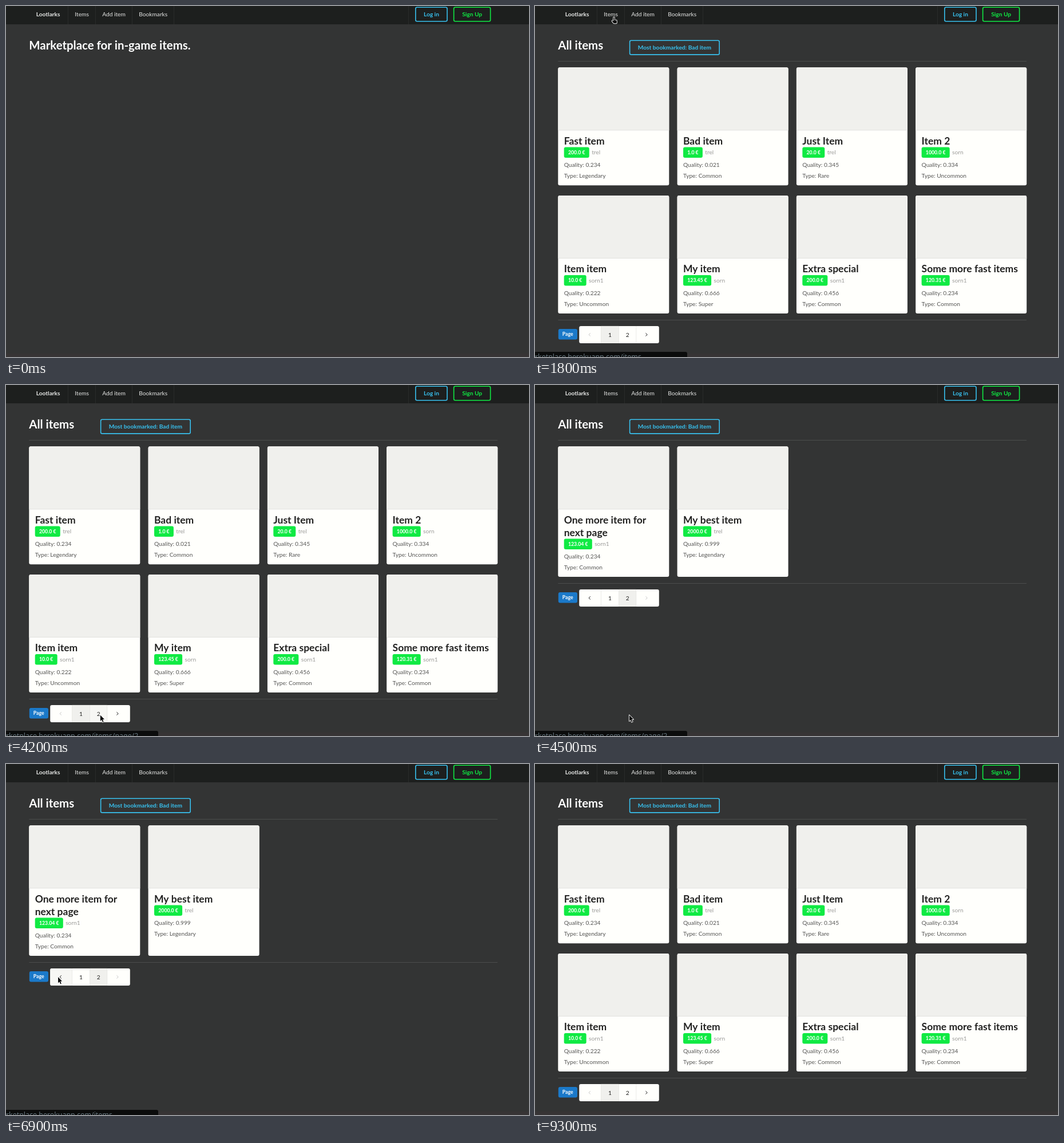
These frames come from a looping animation (914 by 613 pixels, 9600 ms). An HTML page with a canvas:

```html
<!DOCTYPE html>
<html lang="en">
<head>
<meta charset="utf-8">
<title>Item marketplace</title>
<style>
html, body { margin: 0; width: 100%; height: 100%; overflow: hidden; background: #333434; }
canvas { display: block; width: 914px; height: 613px; }
</style>
</head>
<body>
<canvas id="stage"></canvas>
<script>
const W = 914, H = 613, LOOP = 9600, STEP = 100;
const EM = 10.2, SMALL = EM * 6 / 7, H1 = EM * 2, H2 = EM * 12 / 7;
const BLUE = '#38c0ee', GREEN = '#10ea43', PAPER = '#fffffc', TINT = '#f0f0ed', INK = '#222221';
const LEFT = 40.3, WIDTH = 818.7, TOP = 107.3;
const CARD_W = 194, PITCH = 208.3, ROW = 223.6, LINE = 22;

const canvas = document.getElementById('stage');
const ctx = canvas.getContext('2d');
const dpr = window.devicePixelRatio || 1;
canvas.width = W * dpr;
canvas.height = H * dpr;

// title | price | seller | quality | type
const pages = [[
  'Fast item|200.0|trel|0.234|Legendary',
  'Bad item|1.0|trel|0.021|Common',
  'Just Item|20.0|trel|0.345|Rare',
  'Item 2|1000.0|sorn|0.334|Uncommon',
  'Item item|10.0|sorn1|0.222|Uncommon',
  'My item|123.45|sorn|0.666|Super',
  'Extra special|200.0|sorn1|0.456|Common',
  'Some more fast items|120.31|sorn1|0.234|Common'
], [
  'One more item for\nnext page|123.04|sorn1|0.234|Common',
  'My best item|2000.0|trel|0.999|Legendary'
]];

// pointer moves: start, end, then the place reached
const moves = [
  [500, 700, 135, 98], [800, 1000, 138, 19.5],
  [2000, 2300, 208, 264], [3000, 3300, 176, 472], [3400, 3600, 172, 557],
  [3700, 4200, 164.8, 576.5], [5300, 6300, 91, 372], [8700, 9100, 74, 10]
];
const statusTimes = [[1200, 1900], [3900, 4600], [6300, 7500]];

function pointerAt(t) {
  if (t < 500 || t >= 9100) return null;
  let x = 31, y = 165;
  for (const [from, to, mx, my] of moves) {
    const u = Math.min(1, Math.max(0, (t - from) / (to - from)));
    const ease = u * (2 - u);
    x += (mx - x) * ease;
    y += (my - y) * ease;
  }
  return { x, y };
}

function inside(p, x, y, w, h) {
  return p && p.x >= x && p.x < x + w && p.y >= y && p.y < y + h;
}

function rect(x, y, w, h, color, r = 0) {
  ctx.fillStyle = color;
  ctx.beginPath();
  ctx.roundRect(x, y, w, h, r);
  ctx.fill();
}

function text(s, x, y, size, color, weight = 400, align = 'left', family = 'Lato') {
  ctx.font = `${weight} ${size}px ${family}, sans-serif`;
  ctx.fillStyle = color;
  ctx.textAlign = align;
  ctx.fillText(s, x, y);
  return ctx.measureText(s).width;
}

function button(label, x, y, w, color) {
  ctx.strokeStyle = color;
  ctx.lineWidth = 1.6;
  ctx.beginPath();
  ctx.roundRect(x + .8, y + .8, w - 1.6, 24.6, 2.5);
  ctx.stroke();
  text(label, x + w / 2, y + 16.7, EM, color, 700, 'center');
}

function nav(pointer) {
  const color = '#e6e7e6', pad = 11.7;
  const divider = x => rect(Math.floor(x), 0, 1, 32, '#2a2c2b');
  rect(0, 0, W, 32, '#1d1f1e');
  text('Lootlarks', 52.7, 18, EM, inside(pointer, 41, 0, 67, 32) ? '#fff' : color, 700);
  let x = 120.3;
  divider(x - pad);
  for (const label of ['Items', 'Add item', 'Bookmarks']) {
    x += text(label, x, 18, EM, color) + pad;
    divider(x);
    x += pad;
  }
  divider(703);
  button('Log in', 715, 1.4, 56.8, BLUE);
  button('Sign Up', 781.8, 1.4, 65.6, GREEN);
}

function card(item, x, y, h, pointer) {
  const [title, price, seller, quality, type] = item.split('|');
  const left = x + 10.4, lines = title.split('\n');
  const hot = inside(pointer, left, y + 123, CARD_W - 21, LINE * lines.length);
  rect(x, y, CARD_W, h, PAPER, 3);
  rect(x, y, CARD_W, 110, TINT, [3, 3, 0, 0]);
  rect(x, y + 109.2, CARD_W, .7, '#dededb');
  lines.forEach((line, i) =>
    text(line, left, y + 134.4 + i * LINE, H2, hot ? '#1f5f9c' : INK, 700));
  y += (lines.length - 1) * LINE;
  const tag = price + ' €', pad = SMALL * .83;
  ctx.font = `700 ${SMALL}px Lato, sans-serif`;
  const w = ctx.measureText(tag).width + pad * 2;
  rect(left, y + 139.2, w, 18.4, GREEN, 3);
  text(tag, left + pad, y + 151.3, SMALL, '#fff', 700);
  text(seller, left + w + 4.4, y + 151.7, EM, '#9b9b99');
  text('Quality: ' + quality, left, y + 173.7, EM, '#565655');
  text('Type: ' + type, left, y + 192.7, EM, '#565655');
}

function chevron(x, y, dir, color) {
  ctx.strokeStyle = color;
  ctx.lineWidth = 1;
  ctx.beginPath();
  ctx.moveTo(x - 1.4 * dir, y - 2.7);
  ctx.lineTo(x + 1.4 * dir, y);
  ctx.lineTo(x - 1.4 * dir, y + 2.7);
  ctx.stroke();
}

function pager(page, top, pointer) {
  const edges = [77.2, 115.5, 146.5, 176.8, 216.8];
  const disabled = page === 1 ? 0 : 3;
  rect(40.8, top + 5, 33.2, 18.6, '#1b79c9', 3);
  text('Page', 57.3, top + 17.3, SMALL, '#fff', 700, 'center');
  rect(edges[0], top, edges[4] - edges[0], 30, PAPER, 3);
  for (let i = 0; i < 4; i++) {
    const x = edges[i], w = edges[i + 1] - x, mid = x + w / 2;
    const hot = i !== disabled && inside(pointer, x, top, w, 30);
    if (i === page || hot) rect(x, top, w, 30, i === page ? TINT : '#f7f7f4', i ? 0 : [3, 0, 0, 3]);
    if (i) rect(x - .4, top, .8, 30, '#e6e6e3');
    if (i % 3) text(i, mid, top + 18.6, EM, INK, 400, 'center');
    else chevron(i ? 194.8 : 95.4, top + 15, i ? 1 : -1, i === disabled ? '#c9c9c7' : INK);
  }
}

function listing(page, pointer) {
  const items = pages[page - 1], h = page === 1 ? 206 : 227.6;
  const bottom = TOP + h + (page === 1 ? ROW : 0);
  text('All items', LEFT, 76, H1, '#fff', 700);
  button('Most bookmarked: Bad item', 164.8, 59.5, 158.2, BLUE);
  items.forEach((item, i) =>
    card(item, LEFT + (i % 4) * PITCH, TOP + Math.floor(i / 4) * ROW, h, pointer));
  for (const y of [96, Math.round(bottom + 10.6)]) rect(LEFT, y, WIDTH, 1, '#4b4d4c');
  pager(page, bottom + 22, pointer);
}

function status(t) {
  const shown = statusTimes.find(([from, to]) => t >= from && t < to);
  if (!shown) return;
  ctx.globalAlpha = t === shown[0] ? .5 : 1;
  rect(0, 604, 266, 12, '#0b0c0c', [0, 3, 0, 0]);
  const tail = shown === statusTimes[1] ? '/page/2' : '';
  text('rketplace.herokuapp.com/items' + tail, 0, 617, 12.4, '#66767f', 400, 'left', '"Noto Sans"');
  ctx.globalAlpha = 1;
}

// each part is a body path with a light rim
function rimmed(path, body) {
  ctx.lineJoin = ctx.lineCap = 'round';
  ctx.strokeStyle = '#fff';
  ctx.lineWidth = body + 1.8;
  ctx.stroke(path);
  ctx.strokeStyle = ctx.fillStyle = '#0c0c0c';
  ctx.lineWidth = body;
  if (body) ctx.stroke(path);
  ctx.fill(path);
}

const arrow = new Path2D('M0 0V10.4L2.4 8.2L4.1 12.2L5.8 11.5L4.1 7.6H7.2Z');
const hand = new Path2D('M0 .8V5.5L4 6.2V10H0L-2.6 6.6L0 7.6');

function cursor(p, linked) {
  ctx.save();
  ctx.translate(p.x, p.y);
  rimmed(linked ? hand : arrow, linked ? 1.6 : 0);
  ctx.restore();
  ctx.lineCap = 'butt';
}

function draw(time) {
  const t = Math.floor((time % LOOP) / STEP) * STEP;
  const pointer = pointerAt(t);
  ctx.setTransform(dpr, 0, 0, dpr, 0, 0);
  rect(0, 0, W, H, '#333434');
  rect(0, 607, W, 6, '#373435');
  nav(pointer);
  if (t < 1800) text('Marketplace for in-game items.', LEFT, 76, H1, '#fff', 700);
  else listing(t >= 4500 && t < 7400 ? 2 : 1, pointer);
  status(t);
  if (pointer) cursor(pointer, pointer.y < 32);
}

let start;
function tick(now) {
  if (start === undefined) start = now;
  draw(now - start);
  requestAnimationFrame(tick);
}
requestAnimationFrame(tick);
</script>
</body>
</html>
```
